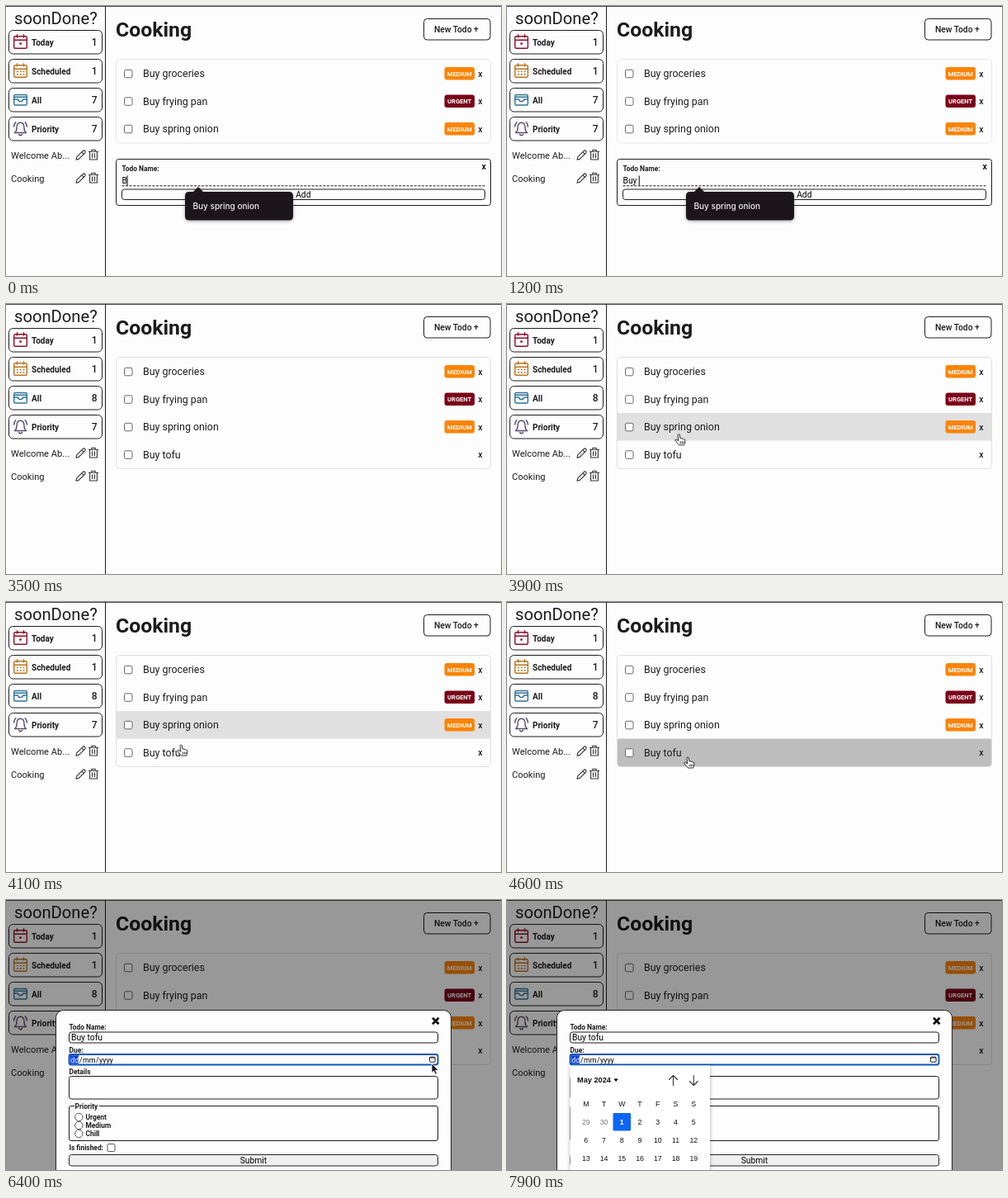
An HTML page that plays this animation: 600x327 px, repeating every 8000 ms.

```html
<!DOCTYPE html>
<html lang="en">
<head>
<meta charset="utf-8">
<title>Todo list</title>
<style>
html, body { margin: 0; width: 100%; height: 100%; overflow: hidden; background: #fdfdfd; }
svg { display: block; width: 100vw; height: 100vh; }
text { font-family: Roboto, Arial, sans-serif; fill: #1c1c1e; }
.line { fill: none; stroke: #1c1c1e; stroke-width: 1; }
.icon { fill: none; stroke-width: 1.4; stroke-linecap: round; stroke-linejoin: round; }
.thin { stroke: #333; stroke-width: 1.1; }
.logo { font-size: 20.2px; }
.title { font-size: 24.8px; font-weight: 700; }
.menu { font-size: 10px; font-weight: 600; }
.count { font-size: 12px; font-weight: 500; text-anchor: end; }
.side { font-size: 11.1px; }
.item { font-size: 12.4px; }
.badge { font-size: 7.6px; font-weight: 700; fill: #fff; text-anchor: middle; }
.x { font-size: 10.5px; font-weight: 500; text-anchor: middle; }
.label { font-size: 8.4px; font-weight: 700; }
.field { font-size: 10.3px; fill: #000; }
.mid { text-anchor: middle; }
.date { font-size: 8.9px; fill: #000; }
.hint { font: 500 10px Inter, sans-serif; fill: #f2f2f2; }
.cal text { font: 8.8px "Liberation Sans", Arial, sans-serif; text-anchor: middle; fill: #111; }
.cal .month { font-size: 9.2px; font-weight: 700; text-anchor: start; }
.cal .dim { fill: #777; }
.cal .day { font-weight: 700; fill: #fff; }

.form, .hintbox, .added, .caret, .bar, .hover3, .hover4, .hand, .modal, .arrow, .focus, .cal {
  animation: 8s step-end infinite;
}
.form { animation-name: form; }
.hintbox { animation-name: hintbox; }
.added { animation-name: added; }
.caret { animation-name: type; }
.bar { animation-name: blink; }
.hover3 { animation-name: hover3; }
.hover4 { animation-name: hover4; }
.hand { animation-name: hand; }
.modal { animation-name: modal; }
.arrow { animation-name: arrow; }
.focus { animation-name: focus; }
.cal { animation-name: cal; }

@keyframes form { 0% { opacity: 1 } 42.5%, 100% { opacity: 0 } }
@keyframes hintbox { 0% { opacity: 1 } 31.25%, 100% { opacity: 0 } }
@keyframes added { 0% { opacity: 0 } 42.5%, 100% { opacity: 1 } }
@keyframes type {
  0% { transform: translateX(6.5px) }
  3.75% { transform: translateX(12.2px) }
  7.5% { transform: translateX(17.1px) }
  12.5% { transform: translateX(19.7px) }
  31.25% { transform: translateX(23.1px) }
  35% { transform: translateX(29px) }
  37.5% { transform: translateX(32.6px) }
  40%, 100% { transform: translateX(38.4px) }
}
@keyframes blink {
  0% { opacity: 1 } 18.75% { opacity: 0 } 25%, 100% { opacity: 1 }
}
@keyframes hover3 { 0% { opacity: 0 } 47.5% { opacity: 1 } 52.5%, 100% { opacity: 0 } }
@keyframes hover4 {
  0% { fill: transparent }
  52.5% { fill: #e0e0e0 }
  56.25% { fill: #bdbdbd }
  58.75%, 100% { fill: transparent }
}
@keyframes hand {
  0% { opacity: 0; transform: translate(206px, 150px) }
  47.5% { opacity: 1; transform: translate(206px, 150px); animation-timing-function: linear }
  51.25% { opacity: 1; transform: translate(212px, 173px); animation-timing-function: ease-out }
  56.25% { opacity: 1; transform: translate(219px, 188px) }
  58.75%, 100% { opacity: 0; transform: translate(219px, 188px) }
}
@keyframes modal { 0% { opacity: 0 } 58.75%, 100% { opacity: 1 } }
@keyframes arrow {
  0% { opacity: 0; transform: translate(219px, 188px) }
  58.75% { opacity: 1; transform: translate(219px, 188px) }
  63.75% { opacity: 1; transform: translate(219px, 188px); animation-timing-function: ease-in-out }
  78.75% { opacity: 1; transform: translate(516px, 198px) }
  82.5%, 100% { opacity: 0; transform: translate(516px, 198px) }
}
@keyframes focus { 0% { opacity: 0 } 80%, 100% { opacity: 1 } }
@keyframes cal { 0% { opacity: 0 } 82.5%, 100% { opacity: 1 } }
</style>
</head>
<body>
<svg viewBox="0 0 600 327" preserveAspectRatio="none">
  <defs>
    <g id="sheet" class="icon">
      <rect x="9.7" y="36.7" width="15.6" height="14.6" rx="1.5"/>
      <path d="M9.7 41.2H25.3M13.5 34.7V38M21.5 34.7V38"/>
    </g>
    <g id="tools" class="icon thin">
      <path d="M85 186.3l.7-3.4 7.6-7.6q1.2-.9 2.3.2t.2 2.3l-7.6 7.6zM91.8 176.8l2.5 2.5"/>
      <path d="M100.3 176.2H111.7M103.8 176V174.3H108.2V176M101.6 176.4V186H110.4V176.4M104.5 178.8V183.6M107.5 178.8V183.6"/>
    </g>
    <filter id="shade" x="-20%" y="-20%" width="140%" height="140%">
      <feDropShadow dx="0" dy="1" stdDeviation="2" flood-opacity=".35"/>
    </filter>
  </defs>

  <rect width="600" height="327" fill="#fdfdfd"/>
  <path class="line" d="M0 .3H600M120.5 0V327"/>

  <text class="logo" x="10" y="22">soonDone?</text>
  <g id="menu"></g>
  <use href="#sheet" stroke="#8b1029"/>
  <circle cx="17.5" cy="45.6" r="1.4" fill="#8b1029"/>
  <use href="#sheet" y="35" stroke="#b87420"/>
  <path d="M13 79.5h9.5M13 82.8h9.5" stroke="#b87420" stroke-width="1.7" stroke-dasharray="1.8 2"/>
  <path class="icon" stroke="#2f7397" d="M11.2 107.5H23.8Q25.3 107.5 25.3 109V118.5Q25.3 120 23.8 120H11.2Q9.7 120 9.7 118.5V109Q9.7 107.5 11.2 107.5ZM9.7 110.3H25.3M9.7 113H14.3Q15 115.6 17.5 115.6T20.7 113H25.3"/>
  <path class="icon" stroke="#574b6b" d="M10.5 153.5Q13 151.5 13 147.5Q13 141.3 17.5 141.3T22 147.5Q22 151.5 24.5 153.5ZM15.5 155.5Q17.5 158 19.5 155.5M11.8 140.8Q9.7 143 9.6 146M23.2 140.8Q25.3 143 25.4 146"/>
  <text class="side" x="6" y="184.5">Welcome Ab...</text>
  <text class="side" x="6" y="212.5">Cooking</text>
  <use href="#tools"/>
  <use href="#tools" y="28"/>

  <text class="title" x="133" y="36.5">Cooking</text>
  <rect class="line" x="506.5" y="15.5" width="80.5" height="25.5" rx="4"/>
  <text class="menu" style="font-size:10.3px;font-weight:500" x="519" y="32">New Todo +</text>

  <rect class="hover3" x="134" y="132" width="453" height="33.5" fill="#e0e0e0"/>
  <rect class="hover4" x="134" y="165.5" width="453" height="33.5" rx="2"/>
  <g id="rows"></g>
  <rect class="line form" style="stroke:#e6e6e6" x="133.5" y="64.5" width="454" height="101.5" rx="4"/>
  <rect class="line added" style="stroke:#dedede" x="133.5" y="64.5" width="454" height="135" rx="4"/>

  <g class="form">
    <rect class="line" x="133.5" y="185.5" width="454" height="56" rx="3"/>
    <text class="label" x="140.5" y="200">Todo Name:</text>
    <text class="x" style="font-weight:700" x="579.3" y="198">x</text>
    <text class="field" x="140.5" y="215">Buy tofu</text>
    <g class="caret">
      <rect x="140.5" y="204" width="50" height="13" fill="#fdfdfd"/>
      <rect class="bar" x="140" y="205.5" width="1" height="12"/>
    </g>
    <path class="line" stroke-dasharray="3 1.6" d="M140.5 217.8H580.5"/>
    <rect class="line" x="140.5" y="222" width="440" height="12.5" rx="3"/>
    <text class="field mid" x="360.3" y="232">Add</text>
    <g class="hintbox">
      <path filter="url(#shade)" fill="#1b191c" d="M222 225H227L233 219L239 225H343Q348 225 348 230V254.5Q348 259.5 343 259.5H222Q217 259.5 217 254.5V230Q217 225 222 225Z"/>
      <text class="hint" x="226.5" y="246">Buy spring onion</text>
    </g>
  </g>

  <g class="modal">
    <rect width="600" height="327" opacity=".4"/>
    <rect x="60.5" y="133.5" width="479" height="210" rx="9" fill="#fdfdfd" stroke="#222"/>
    <path d="M517 142.7L524.5 150.2M524.5 142.7L517 150.2" stroke="#111" stroke-width="2.7"/>
    <text class="label" x="76.5" y="157">Todo Name:</text>
    <rect class="line" x="76.5" y="160" width="447" height="13" rx="3"/>
    <text class="field" x="79" y="170">Buy tofu</text>
    <text class="label" x="76.5" y="184.5">Due:</text>
    <rect class="line" x="76.5" y="187" width="447" height="12.5" rx="3"/>
    <text class="date" x="78.2" y="196.5">dd</text>
    <text class="date"><tspan x="89" y="196.5">/</tspan><tspan x="93">mm</tspan><tspan x="109">/</tspan><tspan x="113">yyyy</tspan></text>
    <g class="focus">
      <rect x="76.5" y="187" width="447" height="12.5" rx="2.5" fill="none" stroke="#0b57b7" stroke-width="1.8"/>
      <rect x="77.5" y="188.2" width="10.6" height="10.2" fill="#0a3fd8"/>
      <text class="date" style="fill:#fff" x="78.2" y="196.5">dd</text>
    </g>
    <rect class="line" x="513.5" y="190.2" width="6.6" height="6" rx=".7"/>
    <path class="line" stroke-width="1.8" d="M513.5 191H520"/>
    <text class="label" x="76.5" y="211">Details</text>
    <rect class="line" x="76.5" y="213.5" width="447" height="27.5" rx="3"/>
    <path class="line" d="M83 249.5H79Q76.5 249.5 76.5 252V289Q76.5 291.5 79 291.5H521Q523.5 291.5 523.5 289V252Q523.5 249.5 521 249.5H113"/>
    <text class="label" x="83.5" y="252.5">Priority</text>
    <g id="radios"></g>
    <text class="label" x="76.5" y="303">Is finished:</text>
    <rect x="123" y="295.5" width="9" height="9" rx="1.5" fill="#fff" stroke="#555"/>
    <rect x="76.5" y="308.5" width="447" height="13.5" rx="3" fill="#efefef" stroke="#222"/>
    <text class="field mid" x="300" y="319">Submit</text>
  </g>

  <g class="cal">
    <rect x="76.5" y="200.5" width="169.5" height="150" fill="#fff" filter="url(#shade)"/>
    <text class="month" x="85" y="221">May 2024</text>
    <path d="M129.3 216.5h5.6l-2.8 3.4z"/>
    <path class="icon thin" d="M201.5 224.5V212.5M196.5 217.5L201.5 212.5L206.5 217.5M226.3 212.5V224.5M221.3 219.5L226.3 224.5L231.3 219.5"/>
    <rect x="128.5" y="258" width="21.5" height="21.5" rx="1" fill="#0b66f5"/>
    <g id="days"></g>
  </g>

  <path class="hand" fill="#fff" stroke="#111" stroke-width=".9" stroke-linejoin="round" d="M-1 .8Q0-.8 1.2.6L2 5Q3.3 4.2 4 5.5Q5.4 4.9 6 6.2Q7.8 5.8 8 7.6Q8 10.5 6.5 13H.4Q-1.5 10.6-4 7.8Q-4.4 6.2-2.8 6.2L-.3 8ZM2.2 8.5V11.3M4.2 8.5V11.3M6 8.5V11"/>
  <path class="arrow" fill="#111" stroke="#fff" stroke-width=".8" d="M0 0V11.4L2.6 9L4.5 13.2L6.5 12.3L4.6 8.2H8.2Z"/>
</svg>
<script>
const fill = (id, list, draw) => {
  document.getElementById(id).innerHTML = list.map(draw).join("");
};

fill("menu", ["Today", "Scheduled", "All", "Priority"], (name, i) => {
  const y = 29.5 + i * 35, count = (n, cls) => `<text class="count ${cls}" x="110.7" y="${y + 18.5}">${n}</text>`;
  const counts = name === "All" ? count(7, "form") + count(8, "added") : count(i < 2 ? 1 : 7, "");
  return `<rect class="line" x="3.5" y="${y}" width="113" height="28.5" rx="5"/>
    <text class="menu" x="31" y="${y + 18}">${name}</text>${counts}`;
});

const todos = [["groceries", "MEDIUM"], ["frying pan", "URGENT"], ["spring onion", "MEDIUM"], ["tofu", ""]];
fill("rows", todos, ([name, level], i) => {
  const y = 82 + i * 33.5;
  const color = level === "URGENT" ? "#7a0019" : "#fb8405";
  const badge = level && `<rect x="531.5" y="${y - 8}" width="36.5" height="15.5" rx="3" fill="${color}"/>
    <text class="badge" x="549.7" y="${y + 2.6}">${level}</text>`;
  return `<g class="${i === 3 ? "added" : ""}">
    <rect x="143.5" y="${y - 4.7}" width="9.5" height="9.5" rx="1.8" fill="#fff" stroke="#666"/>
    <text class="item" x="166" y="${y + 4.4}">Buy ${name}</text>${badge}
    <text class="x" x="574.8" y="${y + 3.8}">x</text></g>`;
});

fill("radios", ["Urgent", "Medium", "Chill"], (name, i) => {
  const y = 263 + i * 10;
  return `<circle cx="88.3" cy="${y}" r="4.7" fill="#fff" stroke="#555"/>
    <text class="label" x="96.5" y="${y + 3}">${name}</text>`;
});

const cells = [..."MTWTFSS", 29, 30, ...Array.from({ length: 19 }, (_, i) => i + 1)];
fill("days", cells, (cell, i) => {
  const cls = i === 9 ? "day" : i === 7 || i === 8 ? "dim" : "";
  return `<text class="${cls}" x="${95.8 + (i % 7) * 21.75}" y="${250 + Math.floor(i / 7) * 22}">${cell}</text>`;
});
</script>
</body>
</html>
```
